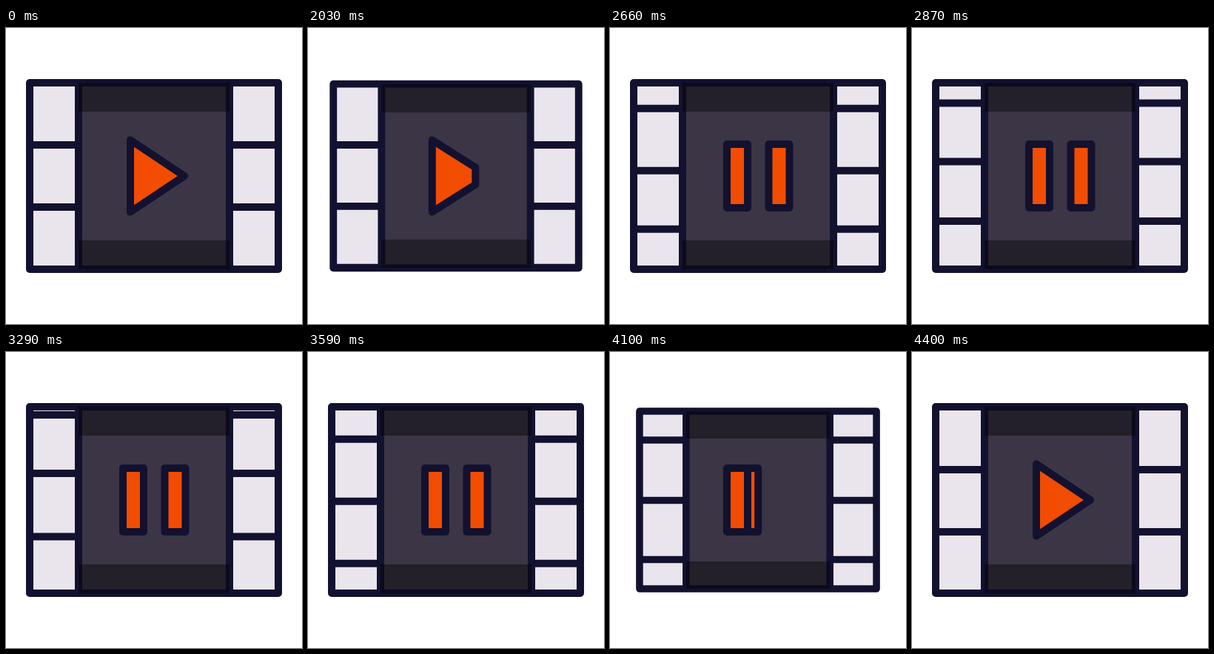
Animation, 400 px wide and 400 px high, one loop 4430 ms. Source, as an HTML page:

```html
<!DOCTYPE html>
<html lang="en">
<head>
<meta charset="utf-8">
<title>Film player</title>
<style>
  html, body { margin: 0; width: 100%; height: 100%; overflow: hidden; background: #fff; }
  svg { display: block; width: 100vw; height: 100vh; }
  .ink { stroke: #12112f; stroke-width: 10; stroke-linejoin: round; stroke-linecap: round; }
</style>
</head>
<body>
<svg viewBox="0 0 400 400">
  <defs><clipPath id="inside"><rect x="32" y="74" width="336" height="252"/></clipPath></defs>
  <g id="film">
    <rect x="32" y="74" width="336" height="252" fill="#eae5ec"/>
    <rect x="98" y="74" width="204" height="252" fill="#3b3545"/>
    <g clip-path="url(#inside)"><path id="bars" class="ink" fill="none"/></g>
    <path class="ink" fill="none" d="M32 74H368V326H32ZM98 74V326M302 74V326"/>
    <path fill="#000" opacity=".4" d="M98 74H302V113H98ZM98 287H302V326H98Z"/>
  </g>
  <g class="ink" fill="#f24c00">
    <path id="right" d="M214.5 157H242.5V243H214.5Z"/>
    <path id="left"/>
  </g>
</svg>
<script>
const LOOP = 4430, START = 2000, BACK = 3960;
const el = id => document.getElementById(id);
const film = el("film"), bars = el("bars"), left = el("left"), right = el("right");

const mix = (a, b, k) => a + (b - a) * k;
const unit = (t, from, span) => Math.min(1, Math.max(0, (t - from) / span));
const smooth = u => u * u * (3 - 2 * u);

// Strip lines as drawn on the film, and its travel: time, distance, speed
const strip = [158, 237, 321, 400, 480.5, 559.5, 645, 729, 813, 898.5, 982.5, 1068];
const travel = [
  [2000, 0, 0], [2030, 0.5, 0.03], [2420, 42, 0.27], [2870, 219, 0.43],
  [3290, 395, 0.44], [3890, 640.5, 0.32], [4400, 739.5, 0.05], [4430, 740.5, 0]
];

function scroll(t) {
  if (t <= START) return 0;
  const i = travel.findIndex(p => t < p[0]);
  const [t0, y0, v0] = travel[i - 1], [t1, y1, v1] = travel[i];
  const d = t1 - t0, u = (t - t0) / d;
  return mix(y0, y1, smooth(u)) + d * u * (1 - u) * (v0 * (1 - u) - v1 * u);
}

const press = (t, from) => Math.sin(Math.PI * unit(t, from, 360));

function draw(t) {
  const s = 1 - 0.05 * (press(t, START) + press(t, BACK));
  film.setAttribute("transform", `translate(200 200) scale(${s}) translate(-200 -200)`);

  const y = scroll(t), slack = 5 * (1 - smooth(unit(t, 2030, 390)));
  bars.setAttribute("d", strip.map((b, i) => b - y + (i && i < 3 ? slack : 0))
    .filter(v => v > 60 && v < 340)
    .map(v => `M32 ${v}H98M302 ${v}H368`).join(""));

  // Triangle folds into the left bar, then the right bar slides out of it
  const k = Math.sin(Math.PI / 2 * (unit(t, START, 180) - unit(t, BACK + 180, 180)));
  const late = k ** 3;
  const x0 = mix(168, 158, late), x1 = mix(241, 186, k);
  const h0 = mix(48.7, 43, late), h1 = 43 * k;
  left.setAttribute("d",
    `M${x0} ${200 - h0}L${x1} ${200 - h1}V${200 + h1}L${x0} ${200 + h0}Z`);

  const slide = smooth(unit(t, START + 160, 180)) - smooth(unit(t, BACK + 20, 180));
  right.setAttribute("transform", `translate(${-56.5 * (1 - slide)} 0)`);
  right.style.display = slide > 0 ? "" : "none";
}

const begin = performance.now();
function tick() {
  draw((performance.now() - begin) % LOOP);
  requestAnimationFrame(tick);
}
tick();
</script>
</body>
</html>
```
